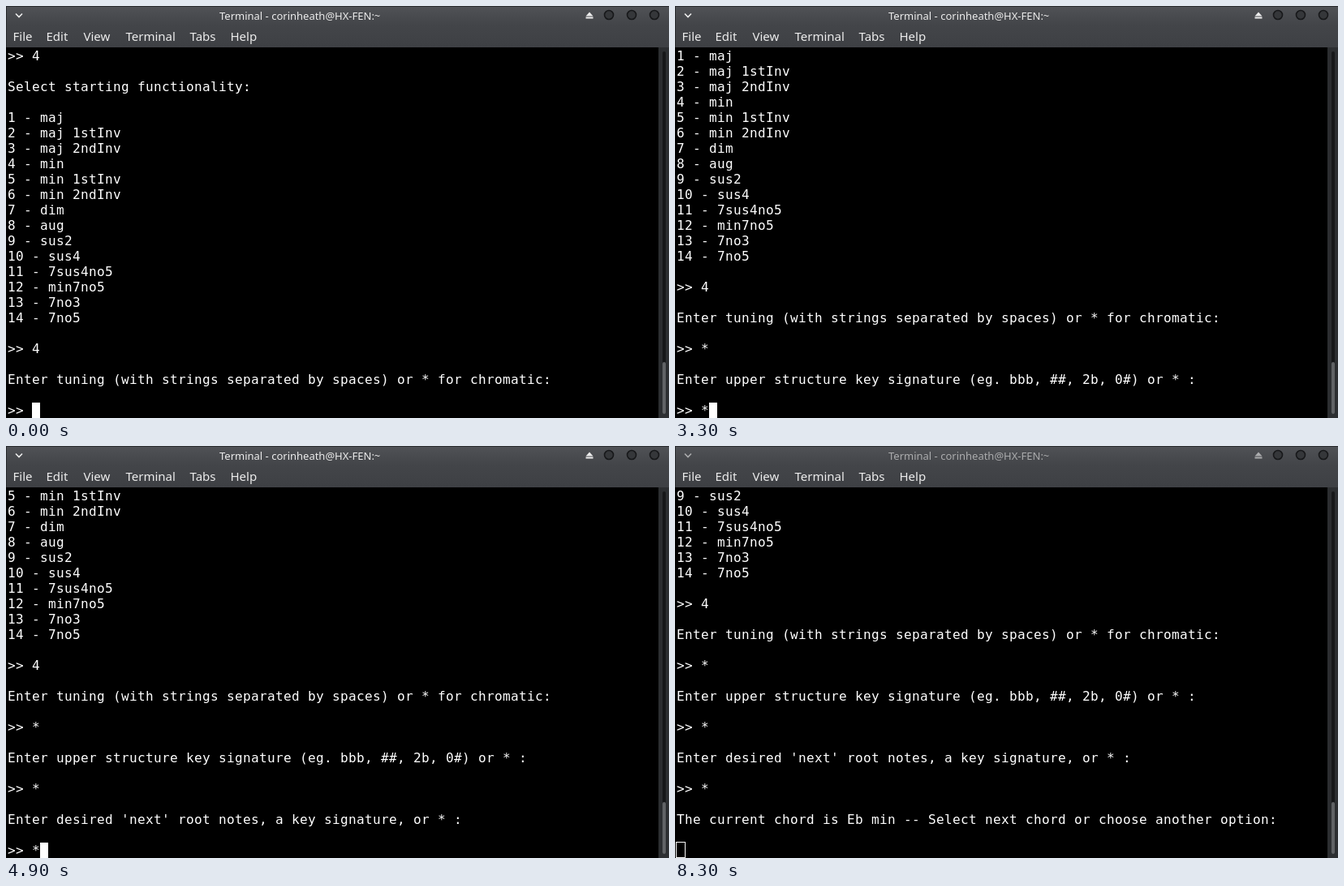
Recreate the animation shown at these times as an HTML page. Size 817 by 508 pixels, loop 8.5 s.

```html
<!DOCTYPE html>
<html lang="en">
<head>
<meta charset="utf-8">
<title>Terminal</title>
<style>
  html, body { margin: 0; width: 100%; height: 100%; overflow: hidden; background: #000; }
  #stage { position: relative; width: 817px; height: 508px; overflow: hidden; background: #000; }
  #frame { position: absolute; left: 0; top: 0; }
  #frame text { font-family: "Noto Sans", "Open Sans", sans-serif; fill: #ececec; }
  .menu text { font-size: 15px; }
  .title text { font-size: 13px; }
  .blurred .title { opacity: .6; }
  #screen, #probe {
    position: absolute; left: 2px; top: 52px; margin: 0; white-space: pre; color: #fff;
    font: 16px/19px "DejaVu Sans Mono", monospace; font-variant-ligatures: none;
  }
  #probe { visibility: hidden; }
  #cursor { position: absolute; top: 489px; width: 10px; height: 19px; background: #fff; }
  .blurred #cursor {
    box-sizing: border-box; margin: -1px 0 0 -1px; width: 12px; height: 20px;
    background: none; border: 1px solid #fff;
  }
</style>
</head>
<body>
<div id="stage">
  <svg id="frame" width="817" height="508">
    <defs>
      <linearGradient id="bar" x1="0" y1="0" x2="0" y2="1">
        <stop offset="0" stop-color="#505256"/>
        <stop offset=".45" stop-color="#434549"/>
        <stop offset="1" stop-color="#3e4044"/>
      </linearGradient>
    </defs>
    <rect width="817" height="51" fill="url(#bar)"/>
    <path d="M0 .5H817M.5 0V51" stroke="#292b2e"/>
    <g class="title">
      <path d="M12 9.5l4 4 4-4" fill="none" stroke="#ececec" stroke-width="1.6"/>
      <text x="263" y="17">Terminal - corinheath@HX-FEN:~</text>
      <path d="M714.5 12.5L719 7.5l4.500 5zM714.500 13.500h9v2h-9z" fill="#ececec"/>
    </g>
    <g fill="#35373a" stroke="#17181a" stroke-width="1.6">
      <circle cx="743" cy="11" r="5.500"/>
      <circle cx="771" cy="11" r="5.500"/>
      <circle cx="799" cy="11" r="5.500"/>
    </g>
    <g class="menu">
      <text x="8.500" y="43">File</text>
      <text x="49.500" y="43">Edit</text>
      <text x="95.500" y="43">View</text>
      <text x="147.500" y="43">Terminal</text>
      <text x="226.500" y="43">Tabs</text>
      <text x="276.500" y="43">Help</text>
    </g>
    <rect x="804" y="51" width="13" height="457" fill="#2c2e31"/>
    <rect x="809" y="56" width="4" height="447" rx="2" fill="#17181a"/>
    <rect x="809" y="439" width="4" height="64" rx="2" fill="#606265"/>
  </svg>
  <pre id="screen"></pre>
  <div id="cursor"></div>
  <span id="probe"></span>
</div>
<script>
const LOOP = 8500, ROWS = 24, CELL = 10, LEFT = 2;
const $ = id => document.getElementById(id);
const stage = $('stage'), screen = $('screen'), cursor = $('cursor'), probe = $('probe');

const chords = ['maj', 'maj 1stInv', 'maj 2ndInv', 'min', 'min 1stInv', 'min 2ndInv', 'dim',
  'aug', 'sus2', 'sus4', '7sus4no5', 'min7no5', '7no3', '7no5'];
const ask = (question, answer) => ['', question, '', '>> ' + answer];
const log = [
  '>> 4', '', 'Select starting functionality:', '',
  ...chords.map((name, i) => `${i + 1} - ${name}`), '', '>> 4',
  ...ask('Enter tuning (with strings separated by spaces) or * for chromatic:', '*'),
  ...ask('Enter upper structure key signature (eg. bbb, ##, 2b, 0#) or * :', '*'),
  ...ask("Enter desired 'next' root notes, a key signature, or * :", '*'),
  '', 'The current chord is Eb min -- Select next chord or choose another option:', ''
];

// start ms, first visible line, input line, window focused
const steps = [
  [0, 0, '>> ', true],
  [1600, 0, '>> *', true],
  [2200, 4, '>> ', true],
  [3300, 4, '>> *', true],
  [4000, 8, '>> ', true],
  [4900, 8, '>> *', true],
  [5900, 12, '', true],
  [8300, 12, '', false]
];

// Snap the glyph advance to the terminal's cell width.
probe.textContent = 'm'.repeat(50);
screen.style.letterSpacing = CELL - probe.getBoundingClientRect().width / 50 + 'px';

let shown = null;
function show(step) {
  if (step === shown) return;
  shown = step;
  const [, top, input, focused] = step;
  screen.textContent = [...log.slice(top, top + ROWS - 1), input].join('\n');
  cursor.style.left = LEFT + input.length * CELL + 'px';
  stage.classList.toggle('blurred', !focused);
}

const start = performance.now();
function tick() {
  const t = (performance.now() - start) % LOOP;
  show(steps.filter(s => s[0] <= t).pop());
  requestAnimationFrame(tick);
}
show(steps[0]);
requestAnimationFrame(tick);
</script>
</body>
</html>
```
